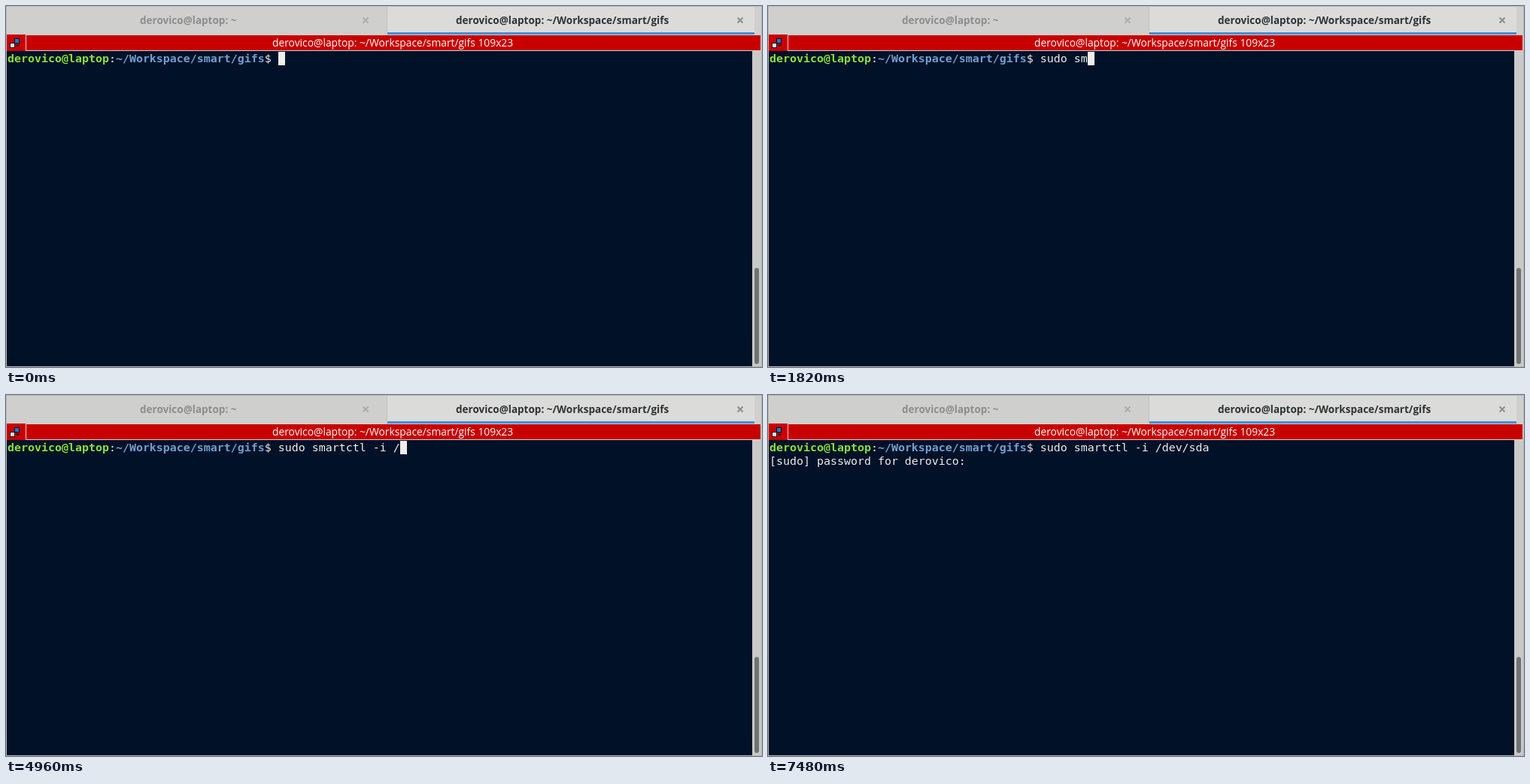
Recreate the animation shown at these times as an HTML page. Size 1005 by 481 pixels, loop 8000 ms.

```html
<!DOCTYPE html>
<html lang="en">
<head>
<meta charset="utf-8">
<title>Terminal</title>
<style>
  html, body { margin: 0; width: 100%; height: 100%; overflow: hidden; }
  body { position: relative; background: #001128; }
  svg { position: absolute; left: 0; top: 0; }
  svg text { font-family: "Open Sans", "Noto Sans", sans-serif; white-space: pre; }
  .tab { font-size: 13.53px; font-weight: 700; }
  .bar { font-size: 13.82px; }
  .close { fill: none; stroke-width: 2; }
  .line {
    position: absolute; left: 2px; margin: 0; white-space: pre; color: #eeeeec;
    font: 14.95px/18px "DejaVu Sans Mono", monospace;
  }
  .line b { color: #8ae234; }
  .line b.path { color: #729fcf; }
  #cursor { position: absolute; width: 9px; height: 18px; background: #eeeeec; }
</style>
</head>
<body>
<svg width="1005" height="481" viewBox="0 0 1005 481">
  <!-- tabs -->
  <rect width="1005" height="38" fill="#cfcfcd"/>
  <rect x="507" y="1" width="488" height="36" fill="#dbdbd9"/>
  <rect x="506" y="1" width="1" height="37" fill="#c3c3c0"/>
  <rect x="507" y="35" width="488" height="3" fill="#3f8fda"/>
  <text class="tab" x="178" y="24" fill="#8b8e8f">derovico@laptop: ~</text>
  <text class="tab" x="598" y="24" fill="#2e3436">derovico@laptop: ~/Workspace/smart/gifs</text>
  <path class="close" d="M474.5 15.5l7 7m0-7l-7 7" stroke="#adaeac"/>
  <path class="close" d="M972.5 15.5l7 7m0-7l-7 7" stroke="#8b8e8d"/>

  <!-- title bar -->
  <rect y="38" width="1005" height="22" fill="#d2cfcc"/>
  <rect x="1" y="38" width="25" height="22" fill="#c80000"/>
  <rect x="27" y="39" width="976" height="20" fill="#c80000"/>
  <rect x="11.5" y="43.5" width="6" height="6" fill="#1878d8" stroke="#101010"/>
  <rect x="5.5" y="49.5" width="6" height="6" fill="#e4e4e4" stroke="#101010"/>
  <path d="M12.500 51.500h6l-3 3z" fill="#101010"/>
  <text class="bar" x="354" y="54" fill="#fff">derovico@laptop: ~/Workspace/smart/gifs 109x23</text>

  <!-- scrollbar and window edge -->
  <rect x="992" y="60" width="12" height="420" fill="#c9c9c7"/>
  <rect x="995" y="349" width="6" height="128" rx="3" fill="#6f7373"/>
  <rect x=".5" y=".5" width="1004" height="480" fill="none" stroke="#b5b5b2"/>
</svg>
<pre class="line" style="top:61px"><b>derovico@laptop</b>:<b class="path">~/Workspace/smart/gifs</b>$ <span id="command"></span></pre>
<pre class="line" style="top:79px" id="reply"></pre>
<div id="cursor"></div>
<script>
const LOOP = 8000, CELL = 9, ROW = 18, LEFT = 2, TOP = 61, PROMPT_CELLS = 40;
const COMMAND = 'sudo smartctl -i /dev/sda';
const REPLY = '[sudo] password for derovico: ';
const ENTER = 7380, ASK = 7480;

// [time, number of typed characters]
const typing = [
  [0, 0], [730, 1], [870, 2], [980, 3], [1120, 4], [1330, 5], [1650, 6],
  [1820, 7], [1880, 8], [2070, 9], [2230, 10], [2810, 11], [3490, 12],
  [3610, 13], [4250, 15], [4420, 16], [4960, 18], [5100, 19], [5170, 20],
  [5770, 21], [5980, 22], [6320, 23], [6540, 24], [6650, 25]
];
const cursorOff = [[2070, 4960], [ASK, LOOP]];

const [command, reply, cursor] = ['command', 'reply', 'cursor'].map(id => document.getElementById(id));

function draw(time) {
  const typed = typing.findLast(([start]) => start <= time)[1];
  const entered = time >= ENTER;
  const hidden = cursorOff.some(([from, to]) => time >= from && time < to);

  command.textContent = COMMAND.slice(0, typed);
  reply.textContent = time >= ASK ? REPLY : '';
  cursor.style.left = LEFT + (entered ? 0 : PROMPT_CELLS + typed) * CELL + 'px';
  cursor.style.top = TOP + (entered ? ROW : 0) + 'px';
  cursor.style.visibility = hidden ? 'hidden' : 'visible';
}

function tick() {
  draw(performance.now() % LOOP);
  requestAnimationFrame(tick);
}
tick();
</script>
</body>
</html>
```
